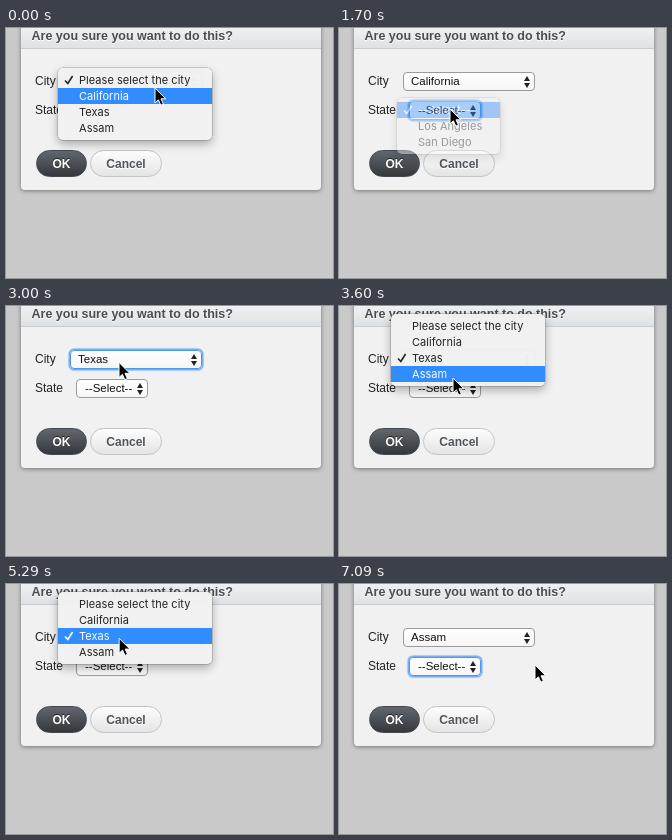
Animation, 327 px wide and 250 px high, one loop 7190 ms. Source, as an HTML page:

```html
<!DOCTYPE html>
<html lang="en">
<head>
<meta charset="utf-8">
<title>Dependent dropdowns</title>
<style>
html, body { margin: 0; width: 100%; height: 100%; overflow: hidden; }
body { position: relative; background: #c9c9c9; font: 12px "Liberation Sans", Arial, sans-serif; color: #222; cursor: default; }
body *, .select::before, .select::after { position: absolute; box-sizing: border-box; white-space: pre; }
#dialog { left: 15px; top: -20px; width: 300px; height: 182px; border-radius: 4px; background: #f1f1f1; box-shadow: 0 1px 4px rgba(0,0,0,.42); overflow: hidden; }
#title { left: 0; top: 0; width: 300px; height: 41px; padding: 21px 0 0 10.5px; font: bold 12.5px/15px "Liberation Sans", Arial, sans-serif; color: #484d54; background: linear-gradient(#f0f1f2 45%, #dfe2e4); border-bottom: 1px solid #c8ccd0; text-shadow: 0 1px #fff; }
.label { left: 29px; line-height: 14px; }
.button { top: 122px; height: 27px; border-radius: 14px; font-weight: bold; line-height: 26px; text-align: center; }
#ok { left: 30px; width: 51px; color: #fff; background: linear-gradient(#62676e, #34383d); border: 1px solid #44494f; text-shadow: 0 -1px #222; }
#cancel { left: 84px; width: 72px; color: #50555b; background: linear-gradient(#fdfdfd, #e4e4e4); border: 1px solid #c2c4c6; text-shadow: 0 1px #fff; }
.select { height: 19px; border: 1px solid #9b9b9b; border-radius: 4px; background: linear-gradient(#fff, #f6f6f6); font-size: 11.5px; line-height: 17px; color: #111; }
.select.focus { border-color: #4f97ec; box-shadow: 0 0 1px 1.5px #6cabf2; }
.select::before, .select::after { content: ""; right: 4px; border: solid transparent; border-width: 0 3px; }
.select::before { top: 3px; border-bottom: 5px solid #222; }
.select::after { top: 10px; border-top: 5px solid #222; }
#city { left: 64px; top: 44px; width: 132px; padding-left: 7px; }
#state { left: 70px; top: 73px; padding-left: 8px; }
#menu { padding: 4px 0; border-radius: 5px; background: rgba(240,241,240,.98); box-shadow: 0 0 0 .5px rgba(0,0,0,.3), 0 4px 10px rgba(0,0,0,.3); }
#menu div { position: relative; height: 16px; padding-left: 21px; font: 11px/16px Inter, sans-serif; letter-spacing: .04px; color: #222; }
#menu .hover { background: #318cfd; color: #fff; }
#menu svg { left: 6px; top: 3px; width: 10px; height: 10px; fill: none; stroke: currentColor; stroke-width: 1.6; }
#pointer { left: -1px; top: -1px; width: 14px; height: 20px; }
</style>
</head>
<body>
<div id="dialog"><div id="title">Are you sure you want to do this?</div></div>
<span class="label" style="top:46px">City</span>
<span class="label" style="top:75px">State</span>
<div class="select" id="city"></div>
<div class="select" id="state"></div>
<div class="button" id="ok">OK</div>
<div class="button" id="cancel">Cancel</div>
<div id="menu"></div>
<svg id="pointer" viewBox="-1 -1 14 20"><path d="M0 0V15L3.4 11.8 5.8 17.2 8.4 16 6 10.8H10.8Z" stroke="#fff"/></svg>
<script>
const LOOP = 7190, STEP = 100, ROW = 16, PAD = 4;
const cities = ["Please select the city", "California", "Texas", "Assam"];
const states = [[], ["Los Angeles", "San Diego"], ["Houston", "Austin"], ["Guwahati", "Dispur"]]
  .map(names => ["--Select--", ...names]);
const controls = {
  city: { left: 52, top: 40, width: 154, home: [113, 54] },
  state: { left: 58, top: 70, width: 103, home: [111, 81] }
};
const $ = id => document.getElementById(id);

// A visit opens a control's menu and clicks at `to`; without a control the pointer only rests there.
const visit = (control, open, close, to = controls[control].home, extra) =>
  ({ control, open, close, to, from: control ? controls[control].home : to, peek: 0, ...extra });
const visits = [
  visit("city", 0, 400, [146, 50], { from: [149, 60] }),
  visit(null, 850, 900, [104, 75]),
  visit("city", 1100, 1300, [112, 66]),
  visit("state", 1600, 1700),
  visit("city", 2000, 2700, [113, 70]),
  visit("city", 3100, 4100, [115, 52], { peek: 19 }),
  visit("state", 4600, 4800),
  visit("city", 5200, 6100, [117, 63]),
  visit("state", 6500, 6700),
  visit(null, 7100, LOOP, [196, 81])
];

// Each click on the city menu decides the city that later visits start with.
let picked = 0;
for (const v of visits) {
  v.city = v.after = picked;
  if (!v.control) continue;
  const isCity = v.control === "city";
  v.items = isCity ? cities : states[picked];
  v.checked = isCity ? picked : 0;
  v.top = controls[v.control].top - ROW * v.checked;
  if (isCity) v.after = picked = rowAt(v, v.to[1]);
}

function rowAt(v, y) {
  return Math.floor((y - v.top - PAD) / ROW);
}

function glide(from, to, k) {
  const eased = k * k * (3 - 2 * k);
  return from.map((start, i) => start + (to[i] - start) * eased);
}

function pointerAt(t) {
  const i = visits.findLastIndex(v => v.open <= t);
  const now = visits[i], next = visits[i + 1];
  if (t > now.close) return glide(now.to, next.from, (t - now.close) / (next.open - now.close));
  const k = (t - now.open) / (now.close - now.open);
  const [x, y] = glide(now.from, now.to, k);
  return [x, y + now.peek * Math.sin(Math.PI * k)];
}

function drawMenu(v, t) {
  const { left, width } = controls[v.control];
  const hover = rowAt(v, pointerAt(Math.min(t, v.close))[1]);
  const opacity = t < v.close ? 1 : t < v.close + STEP ? .42 : 0;
  $("menu").style.cssText = `left:${left}px;top:${v.top}px;width:${width}px;opacity:${opacity}`;
  const tick = '<svg viewBox="0 0 10 10"><path d="M1 5.5 3.8 8.5 8.6 1"/></svg>';
  $("menu").innerHTML = v.items.map((text, i) =>
    `<div class="${i === hover ? "hover" : ""}">${i === v.checked ? tick : ""}${text}</div>`).join("");
}

function draw(t) {
  const current = visits.findLast(v => v.control && v.open <= t);
  const city = t > current.close ? current.after : current.city;
  $("city").textContent = cities[city];
  $("state").textContent = city ? "--Select--" : "----";
  $("state").style.width = city ? "72px" : "40px";
  for (const id in controls) $(id).classList.toggle("focus", current.control === id);
  drawMenu(current, t);
  const [x, y] = pointerAt(t);
  $("pointer").style.transform = `translate(${x}px,${y}px)`;
}

let shown = -1;
function tick() {
  const t = Math.floor((performance.now() % LOOP + 10) / STEP) * STEP;
  if (t !== shown) draw(shown = Math.min(t, LOOP));
  requestAnimationFrame(tick);
}
tick();
</script>
</body>
</html>
```
